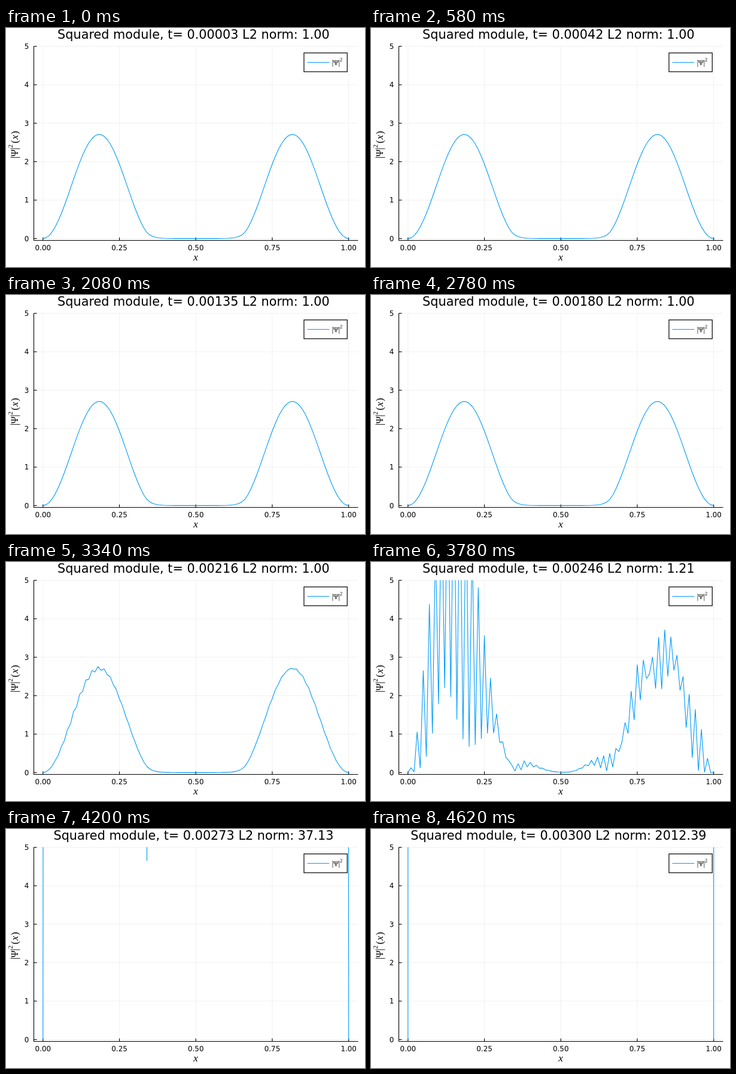
An HTML page with a canvas that plays this animation: 600 by 400 pixels, repeating every 4640 ms.

```html
<!DOCTYPE html>
<html>
<head>
<meta charset="utf-8">
<style>
  html, body { margin: 0; width: 100%; height: 100%; overflow: hidden; background: #fff; }
  canvas { display: block; }
</style>
</head>
<body>
<canvas id="stage" width="600" height="400"></canvas>
<script>
const ctx = document.getElementById('stage').getContext('2d');
const SANS = '"DejaVu Sans", sans-serif';
const SERIF = '"Liberation Serif", serif';
const BLUE = '#009afa';
const LOOP = 4640;
const REF_STEP = 82;

const px = x => 61.8 + 510.9 * x;
const py = y => 352.4 - 64.35 * y;

// Turning points [x, value] of the instability's complex envelope at REF_STEP.
const noiseRe = [[-.07, -1], [.07, 1], [.16, 1.08], [.32, .05], [.39, -.39], [.515, -.04],
  [.615, -.47], [.745, .22], [.83, -.23], [.88, -.1], [.957, -.51], [1.043, .51]];
const noiseIm = [[0, 0], [.01, 0], [.12, 1.44], [.225, .23], [.28, .44], [.38, -.25], [.51, -.08],
  [.575, -.23], [.67, -.2], [.71, .25], [.76, .5], [.873, -.9], [.96, -.1], [1, 0]];

// Smoothstep from one turning point to the next.
function ease(points, x) {
  const i = points.findIndex(p => p[0] >= x && p !== points[0]);
  const [[x0, v0], [x1, v1]] = [points[i - 1], points[i]];
  const u = (x - x0) / (x1 - x0);
  return v0 + (v1 - v0) * u * u * (3 - 2 * u);
}

// Ground state of a double well: sine in the well, decay in the barrier.
function groundState(x) {
  const d = Math.min(x, 1 - x), k = 8.537, edge = 1 / 3;
  return 1.646 * (d < edge ? Math.sin(k * d) : Math.sin(k * edge) * Math.exp(-28 * (d - edge)));
}

// The explicit Euler scheme turns and amplifies the alternating mode at every step.
function density(j, step) {
  const x = j / 100, n = step - REF_STEP;
  const gain = Math.exp(0.4437 * n) * (j % 2 ? 1 : -1);
  const c = gain * Math.cos(0.876 * n), s = gain * Math.sin(0.876 * n);
  const re = ease(noiseRe, x), im = ease(noiseIm, x);
  const value = (groundState(x) + re * c + im * s) ** 2 + (im * c - re * s) ** 2;
  return Math.min(value, 1e4);
}

const norm = step => Math.sqrt(1 + 4049712.5 * Math.exp(-0.88733 * (100 - step)));

function line(x1, y1, x2, y2, color = '#000', width = 1.1) {
  ctx.strokeStyle = color;
  ctx.lineWidth = width;
  ctx.beginPath();
  ctx.moveTo(x1, y1);
  ctx.lineTo(x2, y2);
  ctx.stroke();
}

function text(str, x, y, font, align = 'left') {
  ctx.font = font;
  ctx.textAlign = align;
  ctx.fillStyle = '#000';
  ctx.fillText(str, x, y);
}

// |Ψ|² with its left end at x and the baseline at y.
function psiSquared(x, y, size) {
  const bar = u => line(x + u * size, y - 0.75 * size, x + u * size, y + 0.25 * size, '#000', size / 18);
  bar(0.12);
  text('Ψ', x + 0.2 * size, y, `${size}px ${SERIF}`);
  bar(1.03);
  text('2', x + 1.13 * size, y - 0.54 * size, `${size * 0.7}px ${SERIF}`);
}

function drawAxes() {
  for (let i = 0; i <= 4; i++) line(px(i / 4), 31, px(i / 4), 355.5, 'rgba(0,0,0,.1)', 0.6);
  for (let i = 0; i <= 5; i++) line(46.5, py(i), 588, py(i), 'rgba(0,0,0,.1)', 0.6);
  line(46.5, 30.5, 46.5, 356);
  line(46, 355.5, 588.5, 355.5);
  for (let i = 0; i <= 4; i++) {
    line(px(i / 4), 355.5, px(i / 4), 350.5);
    text((i / 4).toFixed(2), px(i / 4), 371.5, `11.9px ${SANS}`, 'center');
  }
  for (let i = 0; i <= 5; i++) {
    line(46.5, py(i), 51.5, py(i));
    text(i, 38.3, py(i) + 4.4, `11.9px ${SANS}`, 'right');
  }
  text('x', 317, 388.5, `italic 17px ${SERIF}`, 'center');
  ctx.save();
  ctx.translate(19.5, 218.5);
  ctx.rotate(-Math.PI / 2);
  psiSquared(0, 0, 16);
  text('(', 25.5, 0, `17px ${SERIF}`);
  text('x', 32, 0, `italic 17px ${SERIF}`);
  text(')', 40.5, 0, `17px ${SERIF}`);
  ctx.restore();
}

function drawCurve(step) {
  ctx.save();
  ctx.beginPath();
  ctx.rect(46, 30.5, 543, 325);
  ctx.clip();
  ctx.beginPath();
  for (let j = 0; j <= 100; j++) ctx.lineTo(px(j / 100), py(density(j, step)));
  ctx.strokeStyle = BLUE;
  ctx.lineWidth = 1.1;
  ctx.lineJoin = 'bevel';
  ctx.stroke();
  ctx.restore();
}

function drawLegend(step) {
  const left = step >= 84 && step <= 90 ? 64.6 : 498;
  ctx.fillStyle = '#fff';
  ctx.fillRect(left, 41.7, 72.3, 31.5);
  ctx.strokeStyle = '#000';
  ctx.lineWidth = 1.2;
  ctx.strokeRect(left, 41.7, 72.3, 31.5);
  line(left + 5.5, 57.5, left + 42.5, 57.5, BLUE);
  psiSquared(left + 46.5, 62, 12);
}

function draw(step) {
  ctx.fillStyle = '#fff';
  ctx.fillRect(0, 0, 600, 400);
  drawAxes();
  drawCurve(step);
  drawLegend(step);
  const title = `Squared module, t= ${(step * 3e-5).toFixed(5)} L2 norm: ${norm(step).toFixed(2)}`;
  text(title, 313.4, 18.4, `20.8px ${SANS}`, 'center');
}

// Steps last 20, 100 and 20 ms in turn.
function stepAt(ms) {
  const part = ms % 140;
  return 1 + 3 * Math.floor(ms / 140) + (part < 20 ? 0 : part < 120 ? 1 : 2);
}

const start = performance.now();
function tick() {
  draw(stepAt((performance.now() - start) % LOOP));
  requestAnimationFrame(tick);
}
tick();
</script>
</body>
</html>
```
